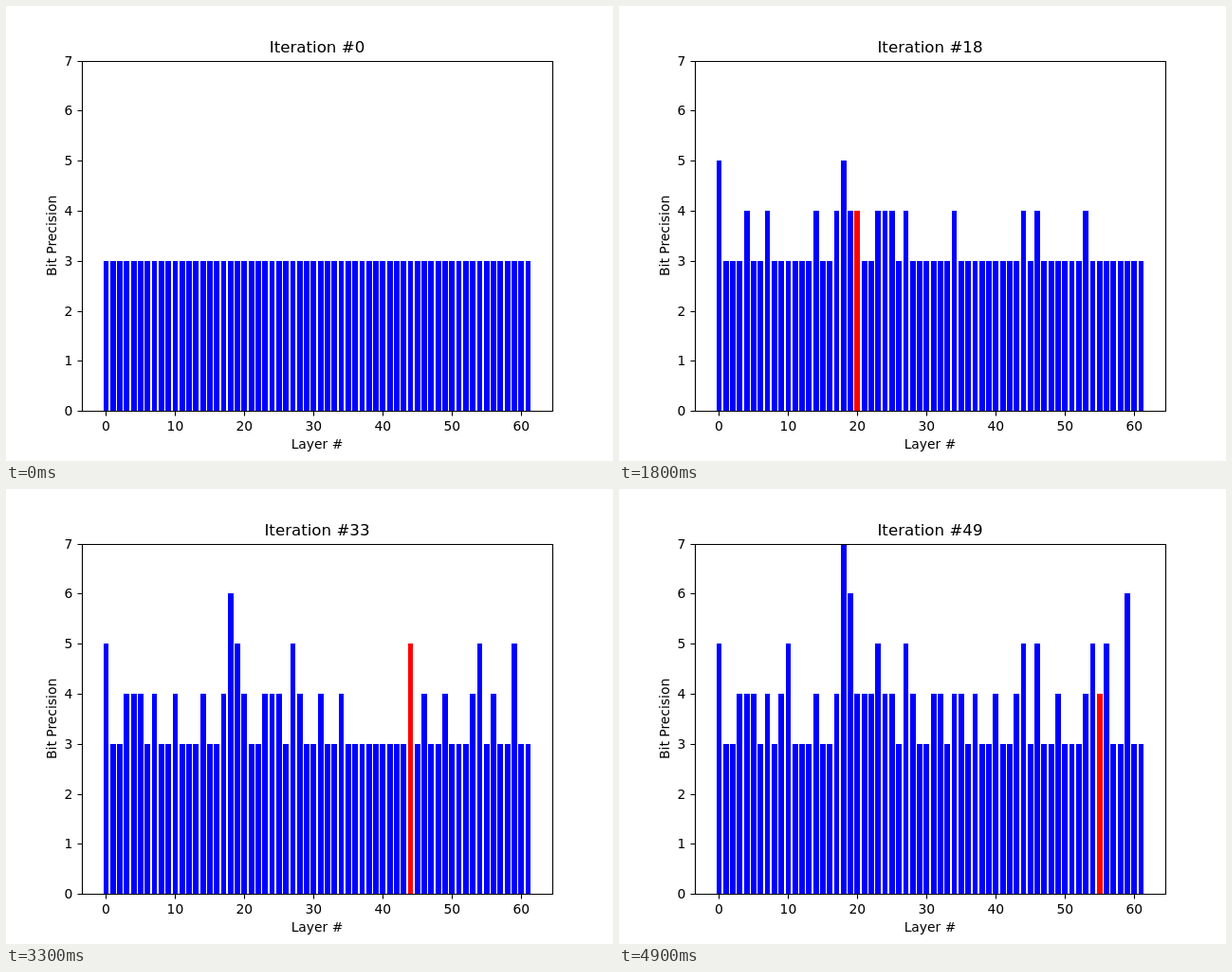
Recreate the animation shown at these times as an HTML page. Size 640 by 480 pixels, loop 5000 ms.

```html
<!DOCTYPE html>
<html lang="en">
<head>
<meta charset="utf-8">
<title>Bit precision per layer</title>
<style>
  html, body { margin: 0; width: 100%; height: 100%; overflow: hidden; background: #fff; }
  svg { display: block; }
  text { font: 13.889px "DejaVu Sans", sans-serif; text-anchor: middle; }
  #title { font-size: 16.667px; }
  #frame { fill: none; stroke: #000; stroke-width: 1.111; }
</style>
</head>
<body>
<svg width="640" height="480" viewBox="0 0 640 480">
  <g id="bars"></g>
  <path id="frame"/>
  <g id="labels"></g>
  <text x="328" y="467">Layer #</text>
  <text transform="translate(53 242.4) rotate(-90)">Bit Precision</text>
  <text id="title" x="328" y="49"></text>
</svg>
<script>
const LAYERS = 62, START = 3, STEP = 100;
// Layer that gains one bit at each iteration, starting with iteration 1
const raised = [
  0, 4, 0, 18, 17, 25, 27, 44, 46, 19,
  7, 24, 14, 53, 34, 18, 23, 20,
  54, 3, 28, 10, 18, 49, 59, 5, 56, 54, 31,
  19, 27, 59, 44, 32, 56, 21, 18,
  59, 9, 46, 19, 22, 40, 43,
  23, 35, 37, 10, 55
];
const $ = id => document.getElementById(id);
const xAt = layer => 80 + (layer + 3.49) * 496 / 67.98;
const yAt = bits => 427.2 - bits * 52.8;

function add(parent, tag, attrs, text = "") {
  const el = document.createElementNS("http://www.w3.org/2000/svg", tag);
  for (const key in attrs) el.setAttribute(key, attrs[key]);
  el.textContent = text;
  return parent.appendChild(el);
}

let path = "M80.5 58.5H576.5V427.5H80.5Z";
for (let n = 0; n <= 60; n += 10) {
  path += `M${Math.round(xAt(n)) + 0.5} 427.5v5`;
  add($("labels"), "text", { x: xAt(n), y: 448 }, n);
}
for (let n = 0; n <= 7; n++) {
  path += `M80.5 ${Math.round(yAt(n)) + 0.5}h-5`;
  add($("labels"), "text", { x: 66, y: Math.round(yAt(n) + 5.06) }, n);
}
$("frame").setAttribute("d", path);

const bars = Array.from({ length: LAYERS }, (_, i) => {
  const x = Math.round(xAt(i - 0.4));
  return add($("bars"), "rect", { x, width: Math.round(xAt(i + 0.4)) - x });
});

function show(iteration) {
  const bits = Array(LAYERS).fill(START);
  const done = raised.slice(0, iteration);
  for (const layer of done) bits[layer]++;
  bars.forEach((bar, i) => {
    const top = Math.round(yAt(bits[i]));
    bar.setAttribute("y", top);
    bar.setAttribute("height", 427 - top);
    bar.setAttribute("fill", i === done[iteration - 1] ? "#f00" : "#00f");
  });
  $("title").textContent = "Iteration #" + iteration;
}

let shown = -1;
function tick() {
  const iteration = Math.floor(performance.now() / STEP) % (raised.length + 1);
  if (iteration !== shown) show(shown = iteration);
  requestAnimationFrame(tick);
}
tick();
</script>
</body>
</html>
```
